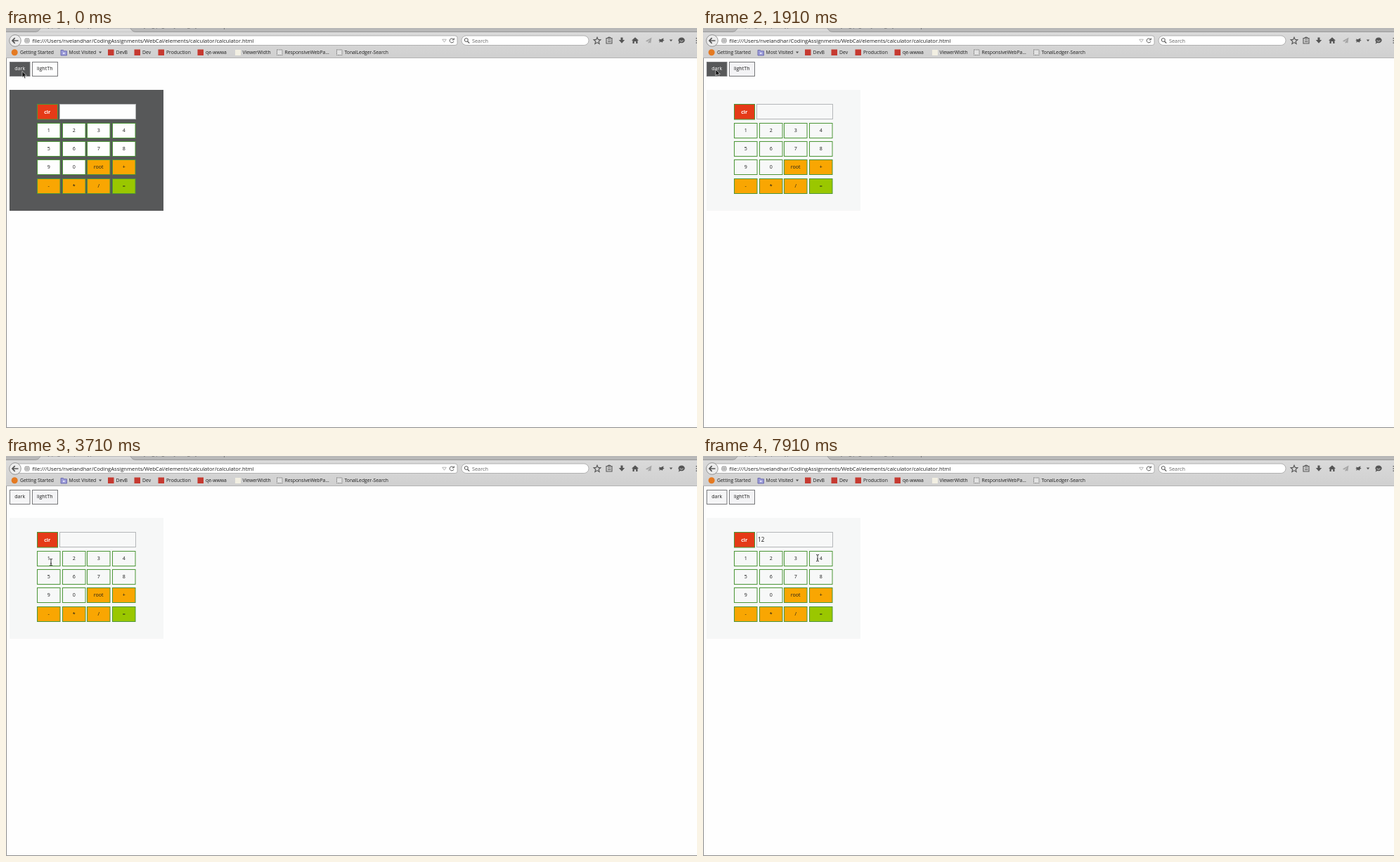
An HTML page for the animation above (8000 ms loop, 983 by 569 pixels).

```html
<!DOCTYPE html>
<html lang="en">
<head>
<meta charset="utf-8">
<title>Calculator themes</title>
<style>
  html, body { margin: 0; width: 100%; height: 100%; overflow: hidden; background: #fefefe; }
  svg { display: block; }
  text { font: 500 7.1px "Open Sans", "Noto Sans", sans-serif; fill: #1c1c1c; }
  .mid { text-anchor: middle; }
  .marks text { font-size: 6.8px; }
  .line { fill: none; stroke: #555; }
  .slot { fill: #e2e2e2; stroke: #666; stroke-width: .8; stroke-dasharray: 1.6 .8; }

  .anim, .anim * { animation: 8s step-end infinite; }
  #panel { animation-name: panel; }
  .key { stroke: #4b9636; }
  .num, #screen { animation-name: paper; }
  #screen { stroke: #b4b7b9; }
  #dark rect, #light rect { stroke: #77787a; }
  #dark rect { animation-name: darkFill; }
  #dark text { animation-name: darkText; }
  #light rect { animation-name: lightFill; }
  #light text { animation-name: lightText; }
  #one { animation-name: one; }
  #two { animation-name: two; }
  #pointer { animation-name: move; }
  #arrow { animation-name: arrow; }
  #beam { animation-name: beam; }

  @keyframes panel {
    0%, 29.5% { fill: #575859; }
    16.375%, 38.875%, 100% { fill: #f6f7f7; }
  }
  @keyframes paper { 0% { fill: #fefefe; } 16.375%, 100% { fill: #f7f8f8; } }
  @keyframes darkFill {
    0%, 22% { fill: #575859; }
    8.875%, 33.25%, 100% { fill: #f5f5f6; }
  }
  @keyframes darkText {
    0%, 22% { fill: #fff; }
    8.875%, 33.25%, 100% { fill: #1c1c1c; }
  }
  @keyframes lightFill {
    0% { fill: #fefefe; }
    8.875%, 33.25% { fill: #575859; }
    22%, 42.625%, 100% { fill: #f3f3f5; }
  }
  @keyframes lightText {
    0%, 22%, 42.625%, 100% { fill: #1c1c1c; }
    8.875%, 33.25% { fill: #fff; }
  }
  @keyframes one { 0% { opacity: 0; } 59.5%, 100% { opacity: 1; } }
  @keyframes two { 0% { opacity: 0; } 67%, 100% { opacity: 1; } }
  @keyframes arrow { 0% { opacity: 1; } 44.5%, 100% { opacity: 0; } }
  @keyframes beam { 0% { opacity: 0; } 44.5%, 100% { opacity: 1; } }
  @keyframes move {
    0% { transform: translate(23px, 61.5px); }
    5.5% { transform: translate(24px, 61.5px); }
    8.875% { transform: translate(62px, 62px); }
    22% { transform: translate(27px, 60px); }
    23.875% { transform: translate(18px, 59px); }
    33.25% { transform: translate(58px, 59px); }
    42.625% { transform: translate(60px, 76px); }
    44.5% { transform: translate(63px, 120px); }
    46.375% { transform: translate(64px, 151px); }
    61.375% { transform: translate(70px, 151px); }
    63.25% { transform: translate(85px, 150px); }
    65.125% { transform: translate(97px, 147px); }
    68.875% { transform: translate(97px, 149px); }
    70.75% { transform: translate(91px, 190px); }
    72.625% { transform: translate(74px, 222px); }
    74.5% { transform: translate(68px, 229px); }
    78.25% { transform: translate(68px, 230px); }
    80.125% { transform: translate(82px, 227px); }
    82% { transform: translate(107px, 217px); }
    83.875% { transform: translate(138px, 206px); }
    85.75% { transform: translate(163px, 199px); }
    89.5% { transform: translate(167px, 198px); }
    93.25% { transform: translate(166px, 204px); }
    95.125% { transform: translate(161px, 174px); }
    97% { transform: translate(162px, 150px); }
    98.875%, 100% { transform: translate(163px, 145px); }
  }
</style>
</head>
<body>
<svg width="983" height="569">
  <defs>
    <linearGradient id="bar" x2="0" y2="1">
      <stop stop-color="#dadada"/><stop offset="1" stop-color="#d0d0d0"/>
    </linearGradient>
  </defs>

  <!-- tab strip and toolbar -->
  <rect width="983" height="6" fill="#b8b8b8"/>
  <path d="M0 5.5H42Q47 5 49 0H177Q179 5 184 5.5H983" fill="#d9d9d9" stroke="#929292" stroke-width=".8"/>
  <rect y="6" width="983" height="36" fill="url(#bar)"/>
  <rect y="42" width="983" height="1" fill="#b4b4b4"/>
  <g opacity=".6">
    <text x="53" y="-.6">my page: simple keypad</text>
    <text x="190" y="-.6">styling pages by category</text>
    <path d="M310.500 0v2" class="line"/>
  </g>

  <rect x="14" y="11" width="628" height="13.500" rx="3" fill="#fff" stroke="#a2a2a2" stroke-width=".8"/>
  <circle cx="13" cy="18" r="8.300" fill="#ececec" stroke="#8c8c8c" stroke-width=".9"/>
  <path d="M17.500 18H9M12.700 14.200L9 18l3.700 3.800" class="line" stroke-width="1.700"/>
  <circle cx="30" cy="18" r="3.900" fill="#a9a9a9"/>
  <path d="M26.500 17h7M27 20h6M30 14q-3.500 4 0 8q3.500-4 0-8" fill="none" stroke="#e4e4e4" stroke-width=".6"/>
  <text x="37.500" y="20.600" style="font-size:7.600px">file:///Users/nvelandhar/CodingAssignments/WebCal/elements/calculator/calculator.html</text>
  <path d="M620.700 16.200h5.600l-2.800 4z" fill="#fff" stroke="#999" stroke-width=".7"/>
  <path d="M636.700 16.200A3 3 0 1 0 637 19M637.300 14.300v2.600h-2.700" class="line" stroke-width="1"/>

  <rect x="648" y="11" width="181" height="13.500" rx="6.700" fill="#fff" stroke="#a2a2a2" stroke-width=".8"/>
  <circle cx="654.800" cy="17" r="2.500" class="line"/>
  <path d="M656.600 19l2.600 2.600" class="line" stroke-width="1.300"/>
  <text x="663" y="20.600" style="font-size:7.300px;fill:#666">Search</text>

  <g class="line" stroke-width="1.100">
    <path d="M841 13.200l1.400 3.200 3.500.3-2.700 2.300.9 3.500-3.100-1.900-3.100 1.900.9-3.500-2.700-2.300 3.500-.3z"/>
    <path d="M854 14.500h8v7.500h-8zM856 14.200q2-2.500 4 0M856 17h4.500M856 19.500h4.500"/>
  </g>
  <g fill="#555">
    <path d="M874.500 13.500h3v3.500h2.700l-4.200 4.700-4.200-4.700h2.700z"/>
    <path d="M895 13.300l5 4.500h-1.500v4.200h-2.300v-3h-2.400v3h-2.300v-4.200H890z"/>
    <path d="M918.500 13.500l-8.700 5 2.500 1 4.200-3.500-3 4 .3 2 1.300-1.300 2.200.8z" fill="#a5a5a5"/>
    <path d="M929 15.500l2.500.7 4-2-.5 2.800 1.800.5-2.300 1.200-.8 2-2-1.300-2.500 1.400.8-2.200-1.800-.7 1.500-.8z"/>
    <path d="M943.800 16.500h4.400l-2.200 2.800z"/>
    <path d="M961 13.500a4.700 3.900 0 1 1-1.500 7.600l-3 1.500 1-2.700A4.700 3.900 0 0 1 961 13.500"/>
    <path d="M981.500 14h1.500v1.300h-1.500zM981.500 17.200h1.500v1.300h-1.500zM981.500 20.400h1.500v1.300h-1.500z"/>
  </g>
  <path d="M958.500 17.800q2.500 2.800 5 0" fill="none" stroke="#ddd" stroke-width=".9"/>

  <!-- bookmarks -->
  <g class="marks">
    <circle cx="12.200" cy="34.800" r="4.500" fill="#e47a22"/>
    <text x="20" y="37.200">Getting Started</text>
    <path d="M78 31.500h3.500l1 1.300h4v6.200h-8.500z" fill="#9b9bd8" stroke="#5d5da8" stroke-width=".8"/>
    <circle cx="82.300" cy="36" r="1.300" fill="#e6e6fb"/>
    <text x="89.500" y="37.200">Most Visited</text>
    <path d="M132 33.500h4.200l-2.100 2.800z" fill="#555"/>
    <g fill="#c63a31">
      <rect x="145" y="30.500" width="8.500" height="8.500"/>
      <rect x="182.500" y="30.500" width="8.500" height="8.500"/>
      <rect x="216.500" y="30.500" width="8.500" height="8.500"/>
      <rect x="272.500" y="30.500" width="8.500" height="8.500"/>
    </g>
    <text x="156.500" y="37.200">DevB</text>
    <text x="194" y="37.200">Dev</text>
    <text x="228" y="37.200">Production</text>
    <text x="284" y="37.200">qe-wwwa</text>
    <rect x="326" y="31" width="8" height="8" fill="#f2efe2"/>
    <text x="336.500" y="37.200">ViewerWidth</text>
    <rect x="385.500" y="31" width="7.500" height="7.500" class="slot"/>
    <text x="396.500" y="37.200">ResponsiveWebPa...</text>
    <rect x="470.500" y="31" width="7.500" height="7.500" class="slot"/>
    <text x="481.500" y="37.200">TonalLedger-Search</text>
  </g>

  <path d="M.5 43V568.500H983" fill="none" stroke="#8b8b8b"/>

  <!-- page -->
  <g class="anim">
    <g id="dark"><rect x="5.500" y="48.500" width="28.500" height="20"/><text class="mid" x="19.700" y="60.300">dark</text></g>
    <g id="light"><rect x="37.500" y="48.500" width="36" height="20"/><text class="mid" x="55.200" y="60.300">lightTh</text></g>
    <rect id="panel" x="5" y="88" width="219" height="172"/>
    <rect class="key" x="44.500" y="108.500" width="29" height="21.500" fill="#e53a17"/>
    <text class="mid" x="58.700" y="121.500" style="font-weight:700;fill:#fff">clr</text>
    <rect id="screen" x="76.500" y="108.500" width="108" height="21"/>
    <g style="--s:8.200px">
      <text id="one" x="78" y="121.800" style="font-size:var(--s)">1</text>
      <text id="two" x="82.800" y="121.800" style="font-size:var(--s)">2</text>
    </g>
    <g id="keys"></g>
    <g id="pointer">
      <path id="arrow" d="M0 0V8.800L2 7l1.500 3.200 1.500-.7L3.600 6.400H6.300z" fill="#111" stroke="#fff" stroke-width=".6"/>
      <path id="beam" d="M-2-4.700Q0-4.700 0-3.500Q0-4.700 2-4.700M0-3.500V3.500M-2 4.700Q0 4.700 0 3.500Q0 4.700 2 4.700M-1 1.700H1" fill="none" stroke="#222" stroke-width=".9"/>
    </g>
  </g>
</svg>
<script>
  const labels = ['1', '2', '3', '4', '5', '6', '7', '8', '9', '0', 'root', '+', '-', '*', '/', '='];
  const key = (label, i) => {
    const x = 44.5 + Math.round(i % 4 * 35.7);
    const y = 135.5 + Math.round((i >> 2) * 26.2);
    const look = i < 10 ? 'class="key num"' : `class="key" fill="${label === '=' ? '#9ac700' : '#f9a602'}"`;
    return `<rect ${look} x="${x}" y="${y}" width="32.500" height="21"/>` +
      `<text class="mid" x="${x + 16.2}" y="${y + 12.8}">${label}</text>`;
  };
  document.getElementById('keys').innerHTML = labels.map(key).join('');
</script>
</body>
</html>
```
